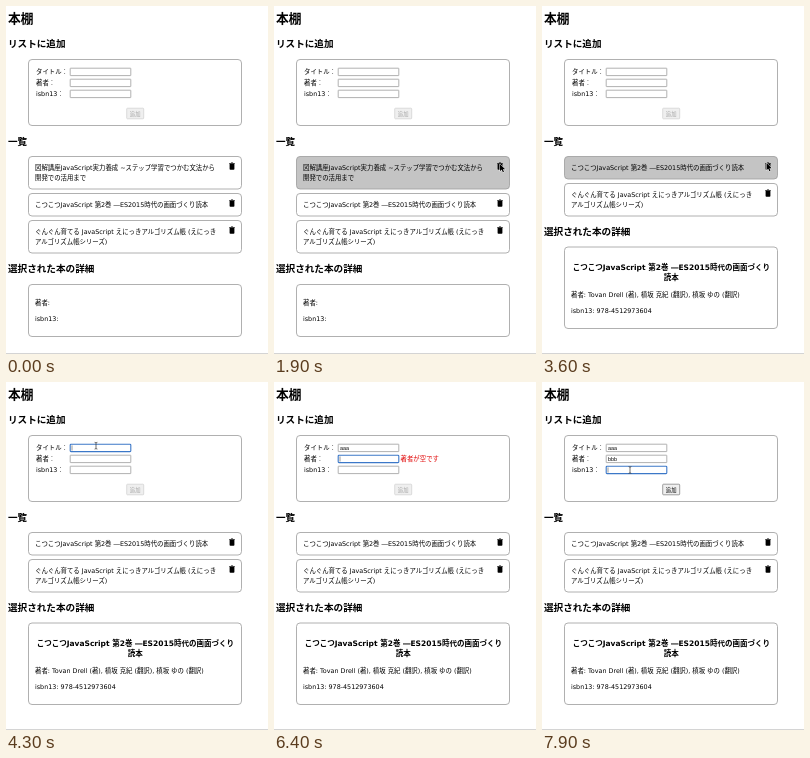
Animation, 262 px wide and 348 px high, one loop 8 s. Source, as an HTML page:

```html
<!DOCTYPE html>
<html lang="ja">
<head>
<meta charset="utf-8">
<title>本棚</title>
<style>
  html, body { margin: 0; width: 100%; height: 100%; overflow: hidden; background: #fff; }
  svg { display: block; font: 6.4px "DejaVu Sans", "Noto Sans CJK JP", "Noto Sans CJK", sans-serif; }
  text { white-space: pre; }
  .h1 { font-size: 12.8px; font-weight: bold; }
  .h2 { font-size: 9.6px; font-weight: bold; }
  .h3 { font-size: 7.5px; font-weight: bold; text-anchor: middle; }
  .field { font: 5.33px "Liberation Sans", "Noto Sans CJK JP", sans-serif; }
  .error { fill: #e00000; }
</style>
</head>
<body>
<svg id="stage" width="262" height="348" viewBox="0 0 262 348"></svg>
<script>
const stage = document.getElementById('stage');
const LOOP = 8000;
const DELETED_AT = 2500;

const books = [
  ['図解講座JavaScript実力養成 ~ステップ学習でつかむ文法から', '開発での活用まで'],
  ['こつこつJavaScript 第2巻 ―ES2015時代の画面づくり読本'],
  ['ぐんぐん育てる JavaScript えにっきアルゴリズム帳 (えにっき', 'アルゴリズム帳シリーズ)'],
];
const fieldTops = [62, 73, 84];

// Pointer visits as runs of [time, x, y]; it is hidden between runs.
const pointerRuns = [
  [[300, 108, 168], [500, 106, 180], [800, 114, 196.5], [1000, 175, 190], [1100, 208, 173],
   [1200, 222, 170], [1400, 229, 168], [1900, 226, 158], [3500, 226, 158],
   [3600, 224.5, 157], [3700, 205, 142], [4000, 92, 64.5], [4200, 90, 63.7], [4800, 90, 63.7]],
  [[5200, 90, 65], [5500, 90, 76], [5700, 90, 76]],
  [[7100, 90, 76], [7400, 88, 82], [7700, 88, 88], [8000, 88, 88]],
];

function pointerAt(t) {
  const run = pointerRuns.find(r => t >= r[0][0] && t < r.at(-1)[0]);
  if (!run) return null;
  const i = run.findIndex(p => p[0] > t);
  const [t0, x0, y0] = run[i - 1], [t1, x1, y1] = run[i];
  const k = (t - t0) / (t1 - t0);
  return { x: x0 + (x1 - x0) * k, y: y0 + (y1 - y0) * k };
}

// Number of characters entered when one key is pressed every 100 ms from `start`.
const keys = (t, start) => Math.max(0, Math.min(3, Math.floor((t - start) / 100) + 1));

const text = (x, y, s, cls = '', extra = '') =>
  `<text x="${x}" y="${y}" class="${cls}" ${extra}>${s}</text>`;
const box = (x, y, w, h, r, stroke, fill = '#fff', width = 0.8) =>
  `<rect x="${x}" y="${y}" width="${w}" height="${h}" rx="${r}" fill="${fill}" stroke="${stroke}" stroke-width="${width}"/>`;
const panel = (y, h, fill) => box(22.5, y, 213, h, 3.5, '#9c9c9c', fill);

const trash = y =>
  `<path transform="translate(221.2 ${y}) scale(.4)" d="M6 7h12v12q0 2-2 2H8q-2 0-2-2zM5 4h4l1-1h4l1 1h4v2H5z"/>`;

function input(y, value, focused) {
  const frame = focused ? box(64.2, y + 0.2, 60.6, 7.4, 0.8, '#3c78c8', '#fff', 1.1)
                        : box(64.2, y + 0.2, 60.6, 7.4, 0.4, '#909090', '#fff', 0.7);
  const caretX = 66 + value.length * 2.96;
  return frame + text(66, y + 5.9, value, 'field') +
    (focused ? `<path d="M${caretX} ${y + 1.4}v5.2" stroke="#000" stroke-width=".4"/>` : '');
}

function pointer({ x, y }) {
  const overField = x > 64 && x < 125 && fieldTops.some(top => y >= top && y <= top + 8);
  return `<g transform="translate(${x} ${y})">` + (overField
    ? '<path d="M-1.4-3.4Q0-3.4 0-2.5Q0-3.4 1.4-3.4M0-2.5v5M-1.4 3.4Q0 3.4 0 2.5Q0 3.4 1.4 3.4" fill="none" stroke="#333" stroke-width=".7"/>'
    : '<path d="M0 0v7.2l1.7-1.6 1.1 2.6 1.2-.5-1.1-2.5h2.3z" stroke="#fff" paint-order="stroke"/>') + '</g>';
}

function form(t) {
  const title = 'aaa'.slice(0, keys(t, 4800));
  const author = 'bbb'.slice(0, keys(t, 5700) - keys(t, 6100) + keys(t, 6600));
  const focus = t < 4200 ? -1 : t < 5500 ? 0 : t < 7800 ? 1 : 2;
  const enabled = title && author;
  const missing = t >= 6300 && !author;
  const labels = ['タイトル：', '著者：', 'isbn13：'];
  const values = [title, author, ''];
  return panel(53.5, 66) +
    labels.map((label, i) => text(30, fieldTops[i] + 6.2, label) +
      input(fieldTops[i], values[i], focus === i)).join('') +
    (missing ? text(126.6, 79.2, '著者が空です', 'error') : '') +
    box(120.7, 102.2, 17, 10.6, 0.8, enabled ? '#777' : '#cfcfcf', '#efefef', 0.7) +
    text(129.2, 109.5, '追加', 'field', `text-anchor="middle" fill="${enabled ? '#000' : '#a5a5a5'}"`);
}

function list(items, mouse) {
  let y = 150.5, out = '';
  for (const lines of items) {
    const h = lines.length > 1 ? 32.5 : 22.5;
    const hovered = mouse && mouse.y >= y && mouse.y <= y + h;
    out += panel(y, h, hovered ? '#c4c4c4' : '#fff') + trash(y + 4.8) +
      lines.map((line, i) => text(29, y + 13.7 + i * 9.8, line)).join('');
    y += h + 4.5;
  }
  return out;
}

function details(selected) {
  if (!selected) {
    return text(2, 265.5, '選択された本の詳細', 'h2') + panel(278.5, 52) +
      text(29, 299.3, '著者:') + text(29, 315.4, 'isbn13:');
  }
  const title = books[1][0];
  return text(2, 228.6, '選択された本の詳細', 'h2') + panel(241, 81.5) +
    text(129.3, 263.6, title.slice(0, -2), 'h3') + text(129.3, 273.6, title.slice(-2), 'h3') +
    text(29, 291.3, '著者: Tovan Drell (著), 槙坂 克紀 (翻訳), 槙坂 ゆの (翻訳)') +
    text(29, 307.4, 'isbn13: 978-4512973604');
}

function draw(t) {
  const mouse = pointerAt(t);
  const deleted = t >= DELETED_AT;
  stage.innerHTML =
    text(2, 17.1, '本棚', 'h1') +
    text(2, 41, 'リストに追加', 'h2') + form(t) +
    text(2, 138.5, '一覧', 'h2') + list(deleted ? books.slice(1) : books, mouse) +
    details(deleted) +
    '<path d="M0 347.5h262" stroke="#d4d4d4"/>' +
    (mouse ? pointer(mouse) : '');
}

const start = performance.now();
let shown = -1;
function tick() {
  const t = Math.floor((performance.now() - start) % LOOP / 100) * 100;
  if (t !== shown) draw(shown = t);
  requestAnimationFrame(tick);
}
tick();
</script>
</body>
</html>
```
